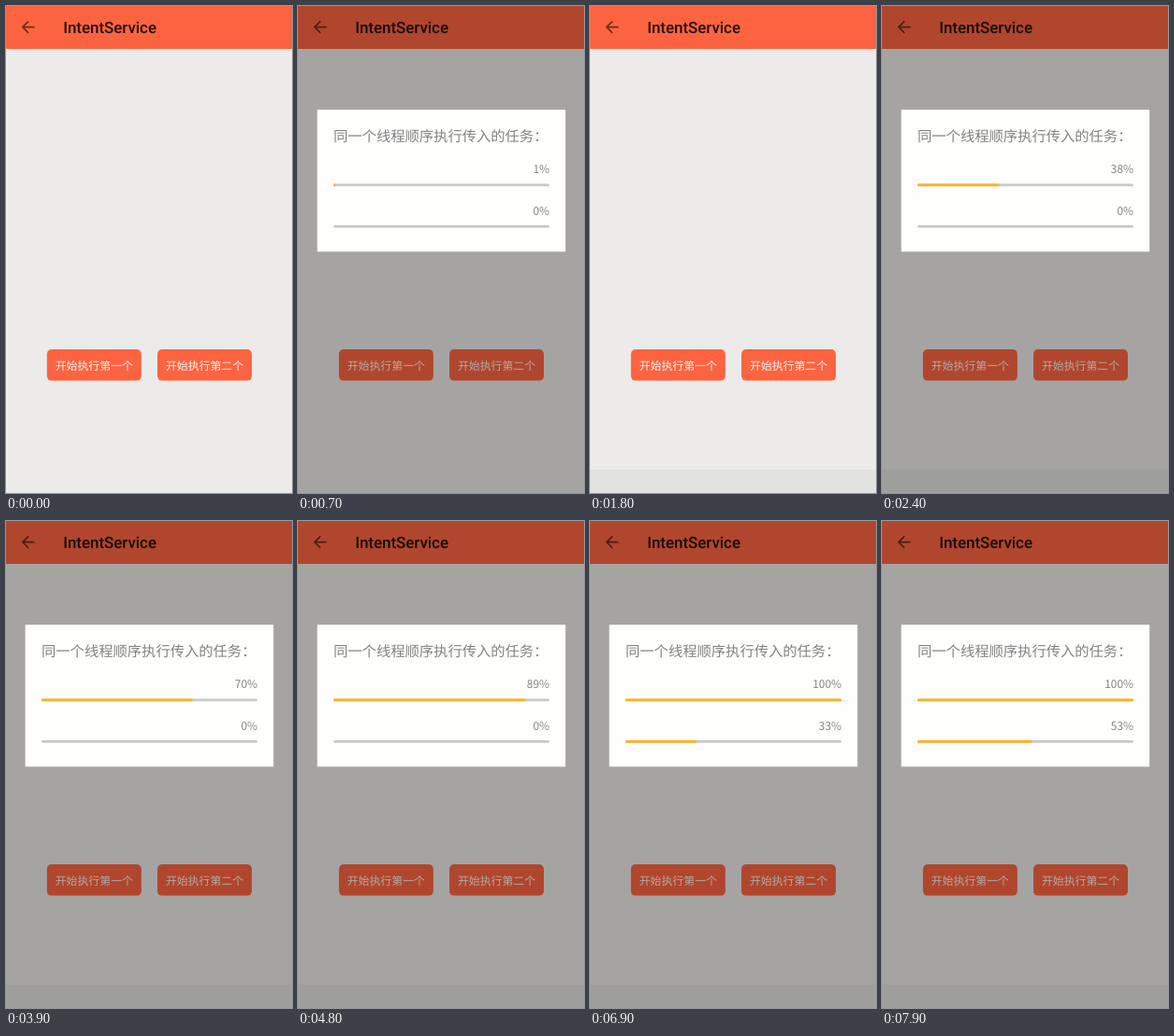
An HTML page for the animation above (8000 ms loop, 306 px wide and 522 px high).

```html
<!DOCTYPE html>
<html lang="zh-CN">
<head>
<meta charset="utf-8">
<title>IntentService</title>
<style>
  html, body { margin: 0; width: 100%; height: 100%; overflow: hidden; background: #ecebe9; }
  svg { display: block; width: 306px; height: 522px; }
  text { font-family: "Noto Sans CJK SC", "Noto Sans CJK", "Noto Sans", sans-serif; text-rendering: geometricPrecision; }
  .title { font: 500 16.9px Roboto, sans-serif; fill: #000; fill-opacity: .87; }
  .label { font-size: 11.9px; fill: #fff; fill-opacity: .92; text-anchor: middle; }
  .head { font-size: 15.3px; fill: #828282; }
  .percent { font-size: 11.9px; fill: #828282; text-anchor: end; }
  .track { fill: #c9c9c9; }
  .fill { fill: #fcb324; }
</style>
</head>
<body>
<svg viewBox="0 0 306 522">
  <rect width="306" height="522" fill="#ecebe9"/>
  <rect id="nav" y="497" width="306" height="25" fill="#e2e2e0"/>
  <rect width="306" height="46" fill="#fc6441"/>
  <path d="M30.5 22.6H18.3M24 16.4L17.8 22.6L24 28.8" fill="none" stroke="#000" stroke-opacity=".56" stroke-width="1.7"/>
  <text class="title" x="61.2" y="29">IntentService</text>
  <g id="buttons"></g>
  <rect id="dim" width="306" height="522" opacity="0"/>
  <g id="dialog" opacity="0">
    <rect x="20.6" y="111.2" width="265.6" height="152.1" fill="#fefefc"/>
    <text class="head" x="38" y="145">同一个线程顺序执行传入的任务：</text>
    <g id="rows"></g>
  </g>
</svg>
<script>
const LOOP = 8000, STEP = 100, BAR_X = 38, BAR_W = 231;
// [time, percent of both tasks added up]
const PROGRESS = [[650, 0], [700, 1], [2400, 38], [3900, 70], [5800, 110], [7900, 153]];
const $ = id => document.getElementById(id);
const clamp = (v, lo, hi) => Math.min(hi, Math.max(lo, v));

function add(parent, tag, attrs, text = '') {
  const el = document.createElementNS('http://www.w3.org/2000/svg', tag);
  for (const key in attrs) el.setAttribute(key, attrs[key]);
  el.textContent = text;
  return parent.appendChild(el);
}

function addButton(x, label) {
  add($('buttons'), 'rect', { x, y: 368, width: 101, height: 33.6, rx: 5, fill: '#fc6441' });
  add($('buttons'), 'text', { class: 'label', x: x + 50.5, y: 389.5 }, label);
}

function addRow(y) {
  const bar = { x: BAR_X, y, height: 2.8, rx: 1.2 };
  const label = add($('rows'), 'text', { class: 'percent', x: BAR_X + BAR_W, y: y - 11.2 });
  add($('rows'), 'rect', { ...bar, class: 'track', width: BAR_W });
  const fill = add($('rows'), 'rect', { ...bar, class: 'fill', width: 0 });
  return percent => {
    label.textContent = percent + '%';
    fill.setAttribute('width', BAR_W * percent / 100);
  };
}

addButton(43.8, '开始执行第一个');
addButton(162, '开始执行第二个');
const rows = [addRow(190.4), addRow(234.9)];

function progressAt(t) {
  if (t <= PROGRESS[0][0]) return 0;
  const i = PROGRESS.findIndex(([time]) => t <= time);
  const [[t0, p0], [t1, p1]] = PROGRESS.slice(i - 1, i + 1);
  return Math.round(p0 + (p1 - p0) * (t - t0) / (t1 - t0));
}

function dialogAt(t) {
  if (t < 600 || (t >= 1800 && t < 2300)) return 0;
  return t === 600 || t === 1700 || t === 2300 ? 0.5 : 1;
}

function draw(time) {
  const t = Math.floor(time % LOOP / STEP) * STEP;
  const shown = dialogAt(t), done = progressAt(t);
  $('nav').setAttribute('opacity', t < 1600 ? 0 : 1);
  $('dim').setAttribute('opacity', 0.3 * shown);
  $('dialog').setAttribute('opacity', shown);
  rows.forEach((set, i) => set(clamp(done - 100 * i, 0, 100)));
}

const start = performance.now();
function tick() {
  draw(performance.now() - start);
  requestAnimationFrame(tick);
}
tick();
</script>
</body>
</html>
```
